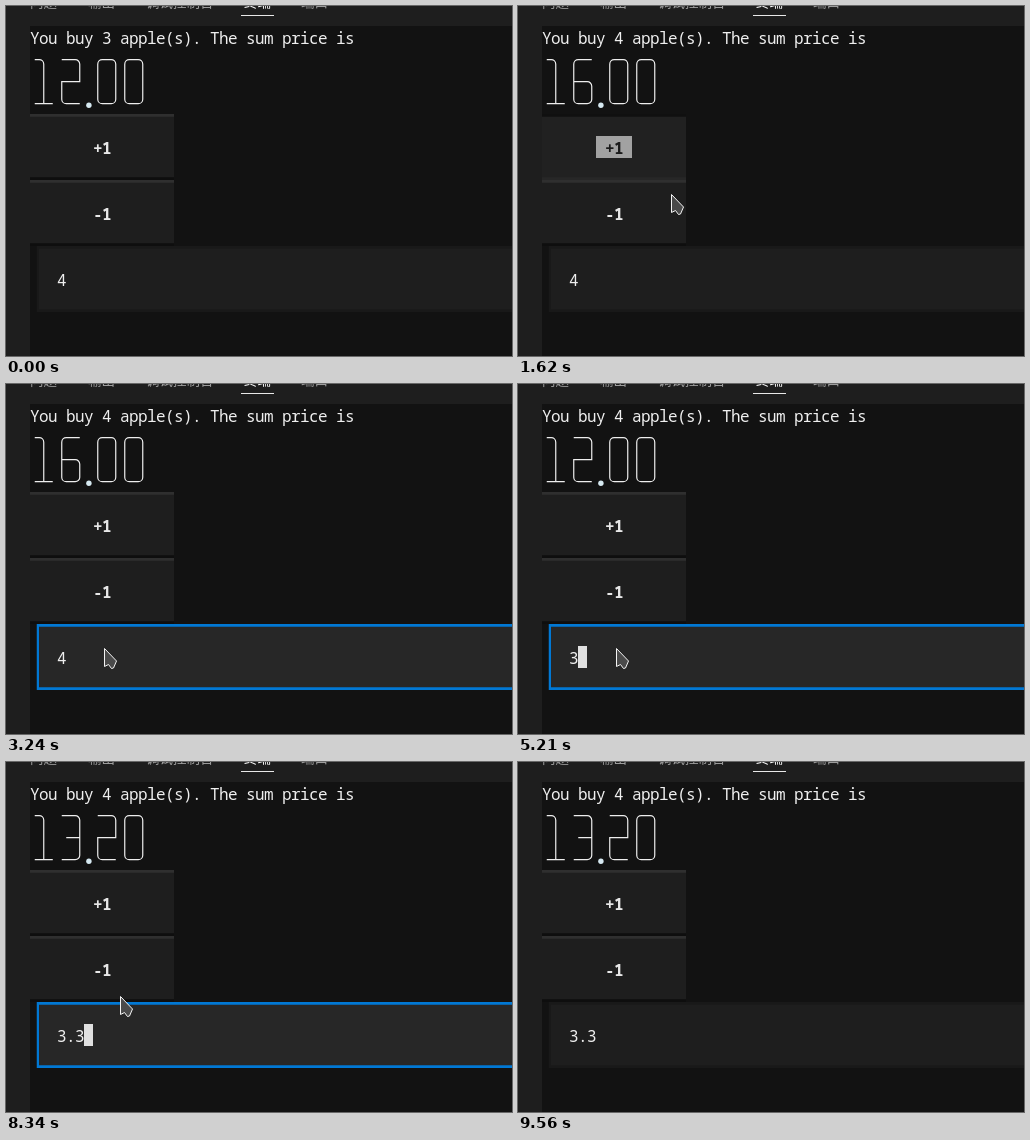
These frames come from a looping animation (506 px wide and 350 px high, 9.64 s). An HTML page:

```html
<!DOCTYPE html>
<html lang="en">
<head>
<meta charset="utf-8">
<title>Apple price terminal</title>
<style>
  html, body { margin: 0; width: 100%; height: 100%; overflow: hidden; background: #1e1e1e; }
  svg { display: block; width: 506px; height: 350px; }
  text {
    font: 500 16px "Noto Sans Mono", "DejaVu Sans Mono", monospace;
    letter-spacing: -.6px;
    fill: #efefef;
  }
  .tabs text {
    font: 13.5px "Noto Sans CJK SC", "Noto Sans CJK", sans-serif;
    letter-spacing: 0;
    fill: #9d9d9d;
  }
  .tabs .active { fill: #fff; }
  .label { font-weight: 700; }
  #digits { fill: none; stroke: #eee; stroke-width: 1.2; }
</style>
</head>
<body>
<svg viewBox="0 0 506 350">
  <rect width="506" height="350" fill="#1e1e1e"/>
  <g class="tabs">
    <text x="24" y="1">问题</text>
    <text x="82" y="1">输出</text>
    <text x="140" y="1">调试控制台</text>
    <text x="238" y="1" class="active">终端</text>
    <text x="295" y="1">端口</text>
    <rect x="235" y="9" width="33" height="1" fill="#e8e8e8"/>
  </g>
  <rect x="24" y="20" width="482" height="330" fill="#121212"/>
  <text id="summary" x="24" y="38"></text>
  <path id="digits" transform="translate(.25 .2)"/>
  <circle cx="82.9" cy="99.3" r="2.7" fill="#d5e8f0"/>

  <g id="plus" transform="translate(24 108)">
    <rect class="face" width="144" height="66"/>
    <rect class="top" width="144" height="2.75"/>
    <rect class="bottom" y="63.25" width="144" height="2.75"/>
    <rect class="mark" x="54" y="22" width="36" height="22"/>
    <text class="label" x="63" y="40">+1</text>
  </g>
  <g id="minus" transform="translate(24 174)">
    <rect class="face" width="144" height="66"/>
    <rect class="top" width="144" height="2.75"/>
    <rect class="bottom" y="63.25" width="144" height="2.75"/>
    <rect class="mark" x="54" y="22" width="36" height="22"/>
    <text class="label" x="63" y="40">-1</text>
  </g>

  <rect id="border" x="30.75" y="240" width="480" height="66"/>
  <rect id="field" x="33" y="242.75" width="478" height="60.5"/>
  <text id="value" x="51" y="280"></text>
  <rect id="caret" y="262" width="9" height="22" fill="#e0e0e0"/>

  <g id="pointer">
    <circle id="ring" cx="1" cy="2" r="15" fill="#ff0" fill-opacity=".47"/>
    <path d="M.5 .5V18.5L4.5 16.5L7.5 20.5L9.5 20L12.5 13Z"
          fill="#4a4a4a" stroke="#f4f4f4" stroke-linejoin="round"/>
  </g>
</svg>
<script>
const LOOP = 9640;
const $ = id => document.getElementById(id);
const within = (t, spans) => spans.some(([a, b]) => t >= a && t < b);
const latest = (t, steps) => steps.filter(([at]) => t >= at).pop()[1];

// Box-drawing strokes on a 27 x 66 digit cell.
const GLYPHS = {
  0: 'm4.5 16a4.5 4.5 0 0 1 4.5-4.5h9a4.5 4.5 0 0 1 4.5 4.5v35a4.5 4.5 0 0 1-4.5 4.5h-9a4.5 4.5 0 0 1-4.5-4.5z',
  1: 'm4.5 11.5h4.5a4.5 4.5 0 0 1 4.5 4.5v39.5m-9 0h18',
  2: 'm4.5 11.5h13.5a4.5 4.5 0 0 1 4.5 4.5v17.5h-18v17.5a4.5 4.5 0 0 0 4.5 4.5h13.5',
  3: 'm4.5 11.5h13.5a4.5 4.5 0 0 1 4.5 4.5v35a4.5 4.5 0 0 1-4.5 4.5h-13.5m4.5-22h13.5',
  6: 'm22.5 11.5h-13.5a4.5 4.5 0 0 0-4.5 4.5v35a4.5 4.5 0 0 0 4.5 4.5h9a4.5 4.5 0 0 0 4.5-4.5v-13a4.5 4.5 0 0 0-4.5-4.5h-13.5'
};

const PRICES = [[0, '12.00'], [1420, '16.00'], [3980, '12.00'], [7020, '13.20']];
const VALUES = [[0, '4'], [3730, ''], [3940, '3'], [5910, '3.'], [7020, '3.3']];
const CARET = [[2260, 3240], [3730, 4720], [5210, 5700], [5910, 6690],
               [7020, 7640], [8130, 8620], [9110, 9560]];
const CLICKS = [[1090, 1340], [2260, 2420]];
const PATH = [
  [160, 393, 0], [200, 345, 88], [240, 308, 146], [280, 297, 162],
  [570, 297, 162], [770, 180, 158], [970, 92, 143],
  [1340, 92, 143], [1500, 158, 166], [1620, 153, 188], [1860, 108, 250], [2060, 98, 264],
  [8300, 98, 264], [8340, 114, 234], [8460, 205, 150], [8620, 389, 2]
];

const FACES = {
  normal: { face: '#1e1e1e', top: '#2f2f2f', bottom: '#0e0e0e', mark: 'none', label: '#e8e8e8' },
  hover: { face: '#1a1a1a', top: '#1e1e1e', bottom: '#0e0e0e', mark: 'none', label: '#e8e8e8' },
  focus: { face: '#282828', top: '#282828', bottom: '#0e0e0e', mark: '#e0e0e0', label: '#1e1e1e' },
  active: { face: '#212121', top: '#101010', bottom: '#272727', mark: '#a2a2a2', label: '#1b1b1b' }
};

function paintButton(id, state) {
  for (const [part, color] of Object.entries(FACES[state]))
    $(id).querySelector('.' + part).style.fill = color;
}

function digitPath(price) {
  let x = 24, d = '';
  for (const c of price) {
    if (c === '.') { x += 9; continue; }
    d += `M${x} 42${GLYPHS[c]}`;
    x += 27;
  }
  return d;
}

function movePointer(t) {
  const base = t < 610 ? 0 : t < 1340 ? 610 : 1340;
  const time = base + Math.floor((t - base) / 40 + 1e-6) * 40;
  const shown = t >= 160 && t < 8660;
  $('pointer').style.display = shown ? '' : 'none';
  if (!shown) return;
  const i = PATH.findIndex(([at]) => at > time);
  const [t1, x1, y1] = i < 0 ? PATH[PATH.length - 1] : PATH[i];
  const [t0, x0, y0] = i < 0 ? PATH[PATH.length - 1] : PATH[Math.max(0, i - 1)];
  const k = t1 > t0 ? (time - t0) / (t1 - t0) : 0;
  const x = Math.round(x0 + (x1 - x0) * k), y = Math.round(y0 + (y1 - y0) * k);
  $('pointer').setAttribute('transform', `translate(${x} ${y})`);
  $('ring').style.display = within(t, CLICKS) ? '' : 'none';
}

function draw(t) {
  const value = latest(t, VALUES);
  const focused = t >= 2260 && t < 9560;
  $('summary').textContent = `You buy ${t < 1420 ? 3 : 4} apple(s). The sum price is`;
  $('digits').setAttribute('d', digitPath(latest(t, PRICES)));
  paintButton('plus', latest(t, [[0, 'normal'], [1340, 'focus'], [1420, 'active'], [1660, 'focus'], [2260, 'normal']]));
  paintButton('minus', within(t, [[8420, 8540]]) ? 'hover' : 'normal');
  $('border').style.fill = !focused ? '#191919' : value ? '#0178d4' : '#ba3c5b';
  $('field').style.fill = focused ? '#272727' : '#1e1e1e';
  $('value').textContent = value;
  $('caret').setAttribute('x', 51 + 9 * value.length);
  $('caret').style.display = within(t, CARET) ? '' : 'none';
  movePointer(t);
}

const start = performance.now();
function tick() {
  draw((performance.now() - start) % LOOP);
  requestAnimationFrame(tick);
}
tick();
</script>
</body>
</html>
```
